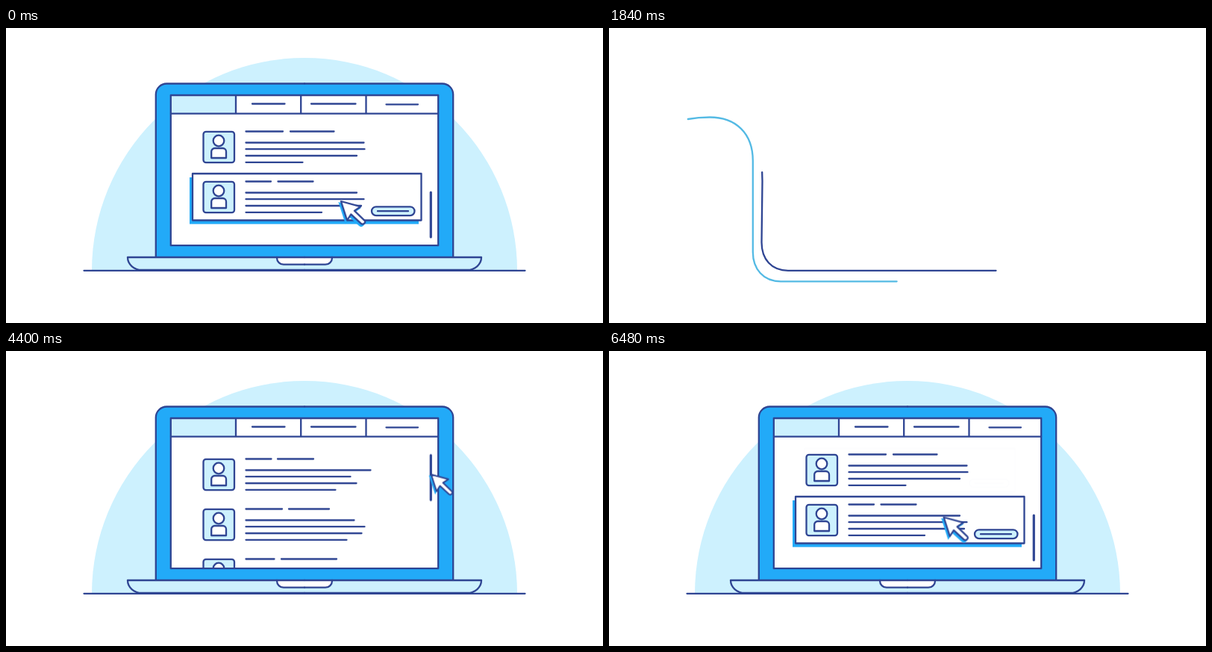
An HTML page for the animation above (6.52 s loop, 800x395 px).

```html
<!DOCTYPE html>
<html lang="en">
<head>
<meta charset="utf-8">
<title>Laptop listing</title>
<style>
  :root { --ink: #2f4593; --blue: #22aaf8; --pale: #cdf1fe; --sky: #54bae4; }
  html, body { margin: 0; width: 100%; height: 100%; overflow: hidden; background: #fff; }
  svg { display: block; width: 100%; height: 100%; }

  .line { fill: none; stroke: var(--ink); stroke-width: 2.3; stroke-linecap: round; stroke-linejoin: round; }
  .box { stroke: var(--ink); stroke-width: 2.3; stroke-linejoin: round; }
  .pale { fill: var(--pale); }
  .white { fill: #fff; }
  .blue { fill: var(--blue); }
  .draw { stroke-dasharray: 1 2; }

  .anim { animation: 6.52s cubic-bezier(.65, 0, .35, 1) infinite; }
  .pan { animation-name: pan; animation-timing-function: cubic-bezier(.333, 0, .667, 0); }
  .dome { animation-name: dome; animation-timing-function: cubic-bezier(.333, 1, .667, 1); transform-origin: 400px 325px; }
  .ground { animation-name: ground; }
  .shade { animation-name: shade; transform-origin: 400px 306px; }
  .lid { animation-name: lid; }
  .screen { animation-name: screen; }
  .lid-line { animation-name: lid-line; }
  .screen-line { animation-name: screen-line; }
  .head { animation-name: head; }
  .tab { animation-name: tab; }
  .base { animation-name: base; }
  .base-line { animation-name: base-line; }
  .notch { animation-name: notch; }
  .notch-line { animation-name: notch-line; }
  .bar { animation-name: bar; }
  .list { animation-name: list; }
  .row { animation-name: row; animation-timing-function: cubic-bezier(.333, 1, .667, 1); animation-delay: calc(var(--i) * 80ms); }
  .card { transform-box: fill-box; transform-origin: center; }
  .first { animation-name: first; }
  .second { animation-name: second; }
  .cursor { animation-name: cursor; }
  .whip { animation-timing-function: linear; }
  .whip.dark { animation-name: whip-dark; }
  .whip.stub { animation-name: whip-stub; stroke: var(--sky); }
  .whip.light { animation-name: whip-light; stroke: var(--sky); }

  /* The scene leaves to the left, then every part resets unseen at 28%. */
  @keyframes pan {
    0%, 12.88% { transform: none; }
    25.2%, 30% { transform: translateX(-1100px); }
    30.01%, 100% { transform: none; }
  }
  @keyframes dome {
    0%, 28% { transform: scale(1); }
    28.01%, 33.56% { transform: scale(0); }
    51.6%, 100% { transform: scale(1); }
  }
  @keyframes ground {
    0%, 28% { stroke-dashoffset: 0; }
    28.01%, 33.13% { stroke-dashoffset: 1.03; }
    39.26%, 100% { stroke-dashoffset: 0; }
  }
  @keyframes base {
    0%, 28% { opacity: 1; }
    28.01%, 39.26% { opacity: 0; }
    42.33%, 100% { opacity: 1; }
  }
  @keyframes base-line {
    0%, 28% { stroke-dashoffset: 0; }
    28.01%, 37.99% { stroke-dashoffset: 1.03; }
    45.05%, 100% { stroke-dashoffset: 0; }
  }
  @keyframes notch {
    0%, 28% { opacity: 1; }
    28.01%, 42.6% { opacity: 0; }
    47.55%, 100% { opacity: 1; }
  }
  @keyframes notch-line {
    0%, 28% { stroke-dashoffset: 0; }
    28.01%, 41.41% { stroke-dashoffset: 1.03; }
    47.55%, 100% { stroke-dashoffset: 0; }
  }
  @keyframes shade {
    0%, 28% { transform: scaleY(1); }
    28.01%, 42.42% { transform: scaleY(0); }
    46.1%, 100% { transform: scaleY(1); }
  }
  @keyframes lid {
    0%, 28% { clip-path: inset(0 0 0 0); }
    28.01%, 43.5% { clip-path: inset(100% 0 0 0); }
    47.18%, 100% { clip-path: inset(0 0 0 0); }
  }
  @keyframes screen {
    0%, 28% { clip-path: inset(0 0 0 0); }
    28.01%, 45.09% { clip-path: inset(100% 0 0 0); }
    48.77%, 100% { clip-path: inset(0 0 0 0); }
  }
  @keyframes lid-line {
    0%, 28% { stroke-dashoffset: 0; }
    28.01%, 48.57% { stroke-dashoffset: 1.03; }
    58.39%, 100% { stroke-dashoffset: 0; }
  }
  @keyframes screen-line {
    0%, 28% { stroke-dashoffset: 0; }
    28.01%, 49.66% { stroke-dashoffset: 1.03; }
    59.48%, 100% { stroke-dashoffset: 0; }
  }
  @keyframes head {
    0%, 28% { stroke-dashoffset: 0; }
    28.01%, 52.27% { stroke-dashoffset: 1.03; }
    62.09%, 100% { stroke-dashoffset: 0; }
  }
  @keyframes tab {
    0%, 28% { opacity: 1; }
    28.01%, 61.96% { opacity: 0; }
    65.64%, 100% { opacity: 1; }
  }
  @keyframes row {
    0%, 28% { transform: none; }
    28.01%, 47.85% { transform: translateX(320px); }
    57.67%, 100% { transform: none; }
  }
  @keyframes bar {
    0%, 28% { transform: translateY(82px); }
    28.01%, 65.8% { transform: none; }
    78.07%, 100% { transform: translateY(82px); }
  }
  @keyframes list {
    0%, 28% { transform: none; }
    28.01%, 66.63% { transform: translateY(275px); }
    80.12%, 100% { transform: none; }
  }
  @keyframes first {
    0%, 86.5% { opacity: 0; transform: scale(.92); }
    89.57%, 96.63% { opacity: 1; transform: none; }
    99.75%, 100% { opacity: 0; transform: scale(.92); }
  }
  @keyframes second {
    0%, 28% { opacity: 1; transform: none; }
    28.01%, 96.32% { opacity: 0; transform: scale(.92); }
    99.2%, 100% { opacity: 1; transform: none; }
  }
  @keyframes cursor {
    0% { transform: translate(448px, 231px); animation-timing-function: cubic-bezier(.2, .2, .4, 1); }
    8.59%, 28% { transform: translate(515px, 246px); }
    28.01%, 52.15% { transform: translate(502px, 298px); }
    64.42% { transform: translate(569px, 163px); }
    65.8% { transform: translate(569px, 163px) scale(.88); }
    78.07% { transform: translate(569px, 245px) scale(.88); }
    79.75% { transform: translate(569px, 245px); }
    87.73%, 94.48% { transform: translate(446px, 165px); animation-timing-function: cubic-bezier(.5, 0, .8, .8); }
    100% { transform: translate(448px, 231px); }
  }

  /* Dash length and offset are the span and tail of each travelling line. */
  @keyframes whip-dark {
    0%, 14.72% { stroke-dasharray: 0px 3000px; stroke-dashoffset: 0px; }
    15.95% { stroke-dasharray: 40px 3000px; stroke-dashoffset: -112px; }
    21.47% { stroke-dasharray: 340px 3000px; stroke-dashoffset: -60px; }
    28.22% { stroke-dasharray: 431px 3000px; stroke-dashoffset: -300px; }
    34.36% { stroke-dasharray: 350px 3000px; stroke-dashoffset: -850px; }
    39.26%, 100% { stroke-dasharray: 1px 3000px; stroke-dashoffset: -1500px; }
  }
  @keyframes whip-stub {
    0%, 14.72% { stroke-dasharray: 0px 3000px; stroke-dashoffset: 0px; }
    15.95% { stroke-dasharray: 70px 3000px; stroke-dashoffset: -61px; }
    21.47% { stroke-dasharray: 60px 3000px; stroke-dashoffset: -62px; }
    21.48%, 100% { stroke-dasharray: 0px 3000px; stroke-dashoffset: 0px; }
  }
  @keyframes whip-light {
    0%, 14.72% { stroke-dasharray: 0px 3000px; stroke-dashoffset: 0px; }
    15.95% { stroke-dasharray: 52px 3000px; stroke-dashoffset: -70px; }
    21.47% { stroke-dasharray: 400px 3000px; stroke-dashoffset: -62px; }
    28.22% { stroke-dasharray: 461px 3000px; stroke-dashoffset: -433px; }
    34.36% { stroke-dasharray: 340px 3000px; stroke-dashoffset: -950px; }
    39.26%, 100% { stroke-dasharray: 1px 3000px; stroke-dashoffset: -1500px; }
  }
</style>
</head>
<body>
<svg viewBox="0 0 800 395">
  <defs>
    <clipPath id="view"><path d="M222 117.5H578V290H222Z"/></clipPath>
    <clipPath id="above"><path d="M0 0H800V290H0Z"/></clipPath>
    <g id="avatar">
      <rect class="box pale" x=".5" y=".8" width="41.5" height="41.4" rx="3.5"/>
      <circle class="box white" cx="21" cy="13" r="7.3"/>
      <path class="box white" d="M11.2 36V27.5a4.5 4.5 0 0 1 4.5-4.5H26.5a4.5 4.5 0 0 1 4.5 4.5V36Z"/>
    </g>
    <g id="card">
      <rect class="blue" x="-18" y="-5" width="307" height="62.5"/>
      <rect class="box white" x="-14" y="-10" width="306.5" height="62.5"/>
      <rect class="box pale" x="226" y="34.3" width="57.5" height="11.8" rx="5.9"/>
      <path class="line" d="M234 40.2h41"/>
    </g>
    <path id="arrow" d="M.8 1 27 8.2 18.8 13.6 32 26.3q2.2 2.3 0 4.3t-4.5 0L14.2 18.4 9 26.5Z"/>
    <g id="half">
      <path class="line draw anim lid-line" pathLength="1" d="M200.8 306V89a14.5 14.5 0 0 1 14.5-14.5H400"/>
      <path class="line draw anim base-line" pathLength="1" d="M400 324H182a19 17 0 0 1-19-17H400"/>
      <path class="line draw anim notch-line" pathLength="1" d="M400 316.7H372a9 9 0 0 1-9-9V307"/>
    </g>
  </defs>

  <g class="anim pan">
    <path class="pale anim dome" d="M115 325a285 285 0 0 1 570 0Z"/>
    <path class="line draw anim ground" pathLength="1" d="M104.5 324.8H695.5"/>

    <rect class="anim shade" x="200" y="90" width="398" height="216" fill="#2f98cb"/>
    <path class="blue anim lid" d="M200.5 307V89a14.5 14.5 0 0 1 14.5-14.5H585a14.5 14.5 0 0 1 14.5 14.5V307Z"/>
    <rect class="white anim screen" x="221" y="90" width="358" height="201"/>

    <g clip-path="url(#view)">
      <g class="anim list">
        <g transform="translate(264 -130)"><g class="anim row" style="--i:0">
          <use href="#avatar"/>
          <path class="line" d="M57.5.5h34M100 .5h48M57.5 15.5h167M57.5 24.2h140M57.5 33h148M57.5 41.8h120"/>
        </g></g>
        <g transform="translate(264 -63)"><g class="anim row" style="--i:1">
          <use href="#avatar"/>
          <path class="line" d="M57.5.5h48.500M115 .5h54M57.5 15.5h145M57.5 24.2h159M57.5 33h155M57.5 41.8h135"/>
        </g></g>
        <g transform="translate(264 4)"><g class="anim row" style="--i:2">
          <use href="#avatar"/>
          <path class="line" d="M57.5.5h38M105 .5h74M57.5 15.5h160M57.5 24.2h150M57.5 33h140M57.5 41.8h110"/>
        </g></g>
        <g transform="translate(264 71)"><g class="anim row" style="--i:3">
          <use href="#avatar"/>
          <path class="line" d="M57.5.5h45M111 .5h52M57.5 15.5h155M57.5 24.2h153M57.5 33h163M57.5 41.8h135"/>
        </g></g>
        <g transform="translate(264 138)"><g class="anim row" style="--i:4">
          <use href="#card" class="card anim first"/>
          <use href="#avatar"/>
          <path class="line" d="M57.5.5h49.500M117 .5h58.500M57.5 15.5h158M57.5 24.2h159M57.5 33h148.500M57.5 41.8h76"/>
        </g></g>
        <g transform="translate(264 205)"><g class="anim row" style="--i:5">
          <use href="#card" class="card anim second"/>
          <use href="#avatar"/>
          <path class="line" d="M57.5.5h33.500M100.500.5h47M57.5 15.5h148.500M57.5 24.2h158M57.5 33h154.500M57.5 41.8h101.500"/>
        </g></g>
      </g>
    </g>

    <path class="pale anim tab" d="M221 90H308V115H221Z"/>
    <path class="line draw anim head" pathLength="1" d="M221.5 114.700H579"/>
    <path class="line draw anim head" pathLength="1" d="M308 91V114"/>
    <path class="line draw anim head" pathLength="1" d="M395.200 91V114"/>
    <path class="line draw anim head" pathLength="1" d="M482.500 91V114"/>
    <path class="line draw anim head" pathLength="1" d="M330 101.500H373.500"/>
    <path class="line draw anim head" pathLength="1" d="M409 101.500H468.500"/>
    <path class="line draw anim head" pathLength="1" d="M509.500 102.300H552"/>
    <path class="line draw anim screen-line" pathLength="1" d="M220.800 115V291.200H579.200V90H220.800V115"/>
    <g class="anim bar">
      <path class="line draw anim head" pathLength="1" style="stroke-width:3.2" d="M569.300 138V198"/>
    </g>

    <path class="pale anim base" d="M163 307H637a19 17 0 0 1-19 17H182a19 17 0 0 1-19-17Z"/>
    <path class="white anim notch" d="M363 307H437v.7a9 9 0 0 1-9 9H372a9 9 0 0 1-9-9Z"/>
    <use href="#half"/>
    <use href="#half" transform="matrix(-1 0 0 1 800 0)"/>

    <g clip-path="url(#above)">
      <g class="anim cursor">
        <use href="#arrow" x="-2" y="2.500" fill="#22aaf8" stroke="#22aaf8" stroke-width="2"/>
        <use href="#arrow" class="box white"/>
      </g>
    </g>
  </g>

  <path class="line anim whip stub" d="M820 325H240"/>
  <path class="line anim whip dark" d="M820 324.800H240C218 324.800 204.500 310 204.500 287L205.500 205Q205 190 205 180C205 142 184 119 150 119S100 150 100 190V290C100 312 112 324.800 135 324.800H400"/>
  <path class="line anim whip light" d="M820 339.300H230C207 339.300 192.800 323 192.800 300V178C192.800 141 170 119.500 135 119.500C60 119.500 14 165 14 229C14 290 50 339.300 110 339.300H300"/>
</svg>
</body>
</html>
```
